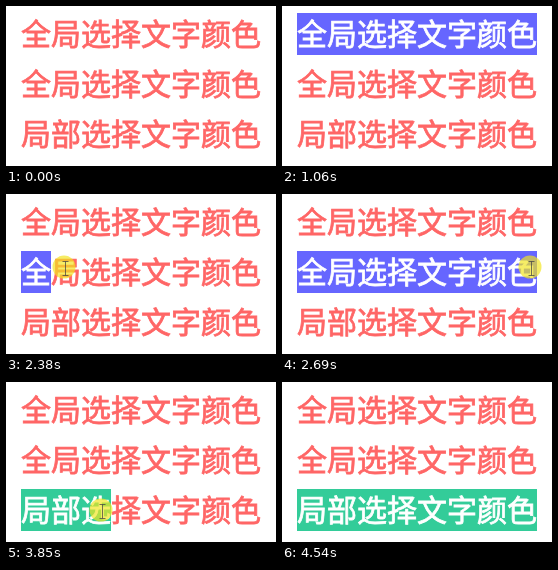
Animation, 270 px wide and 160 px high, one loop 5170 ms. Source, as an HTML page:

```html
<!DOCTYPE html>
<html lang="zh-CN">
<head>
<meta charset="utf-8">
<title>选择文字颜色</title>
<style>
html, body { margin: 0; width: 100%; height: 100%; overflow: hidden; background: #fff; }
#stage { position: relative; width: 270px; height: 160px; overflow: hidden; }
p {
  position: absolute; left: 15px; margin: 0; height: 42px; white-space: nowrap;
  display: flex; color: #f66; -webkit-text-stroke: .8px currentColor;
  font: 500 30px/38px "Noto Sans CJK SC", "Noto Sans CJK", sans-serif;
}
p:nth-of-type(1) { top: 7px; }
p:nth-of-type(2) { top: 57px; }
p:nth-of-type(3) { top: 107px; }
p span { width: 30px; height: 42px; }
.on { color: #fff; background: #66f; }
p:nth-of-type(3) .on { background: #3c9; }
svg { position: absolute; left: 0; top: 0; }
</style>
</head>
<body>
<div id="stage">
  <p>全局选择文字颜色</p>
  <p>全局选择文字颜色</p>
  <p>局部选择文字颜色</p>
  <svg width="270" height="160">
    <g id="pointer">
      <circle id="press" r="11.5" fill="#f2e41e" fill-opacity=".68"/>
      <path id="beam" d="M-1.5-5.5h6M1.5-5.5v14M-1.5 8.5h6" fill="none" stroke="#444" stroke-opacity=".75"/>
      <path id="arrow" d="M.5.5V16.5L4.2 13 6.8 18.6 9.3 17.5 6.9 12H11.8Z" fill="#fff" stroke="#111"/>
    </g>
  </svg>
</div>
<script>
const LOOP = 5170, FIRST = 57, STEP = 77.1;
const $ = id => document.getElementById(id);

const smooth = u => u * u * (3 - 2 * u);
const easeOut = u => 1 - (1 - u) ** 2;
const linear = u => u;

// Pointer moves; each rests at its end until the next. A row means the button is down.
const moves = [
  { start: 0, end: 0, from: [300, 46], to: [300, 46], ease: linear },
  { start: 55, end: 590, from: [218, 46], to: [21, 26], ease: smooth },
  { start: 750, end: 1055, from: [18, 28], to: [290, 28], ease: smooth, row: 0 },
  { start: 1440, end: 1910, from: [77, 50], to: [13, 72], ease: smooth },
  { start: 1980, end: 2220, from: [16, 73], to: [16, 73], ease: linear, row: 1 },
  { start: 2220, end: 2830, from: [16, 73], to: [290, 73], ease: smooth, row: 1 },
  { start: 2980, end: 3610, from: [260, 61], to: [14, 135], ease: easeOut },
  { start: 3660, end: 4220, from: [14, 130], to: [273, 125], ease: linear, row: 2 },
  { start: 4525, end: 4600, from: [300, 125], to: [300, 125], ease: linear }
];

const rows = [...document.querySelectorAll('p')].map(p => {
  const spans = [...p.textContent].map(ch => {
    const s = document.createElement('span');
    s.textContent = ch;
    return s;
  });
  p.replaceChildren(...spans);
  return spans;
});

function locate({ start, end, from, to, ease }, t) {
  const u = ease(Math.min(1, (t - start) / (end - start || 1)));
  return from.map((a, i) => Math.round(a + (to[i] - a) * u));
}

const show = (el, on) => el.setAttribute('visibility', on ? 'visible' : 'hidden');

function draw(time) {
  const t = Math.max(0, FIRST + STEP * Math.floor((time - FIRST) / STEP));
  const begun = moves.filter(m => m.start <= t);
  const move = begun.at(-1);
  const drag = begun.findLast(m => m.row !== undefined);

  const count = drag ? Math.round((locate(drag, t)[0] - 15) / 30) : 0;
  rows.forEach((spans, r) => spans.forEach((s, i) =>
    s.classList.toggle('on', !!drag && r === drag.row && i < count)));

  const [x, y] = locate(move, t);
  const pressed = move === drag;
  const overText = x >= 15 && x < 255 && y >= 7 && (y - 7) % 50 < 42;
  show($('press'), pressed);
  show($('beam'), pressed || overText);
  show($('arrow'), !pressed && !overText);
  $('pointer').setAttribute('transform', `translate(${x} ${y})`);
}

const start = performance.now();
function tick() {
  draw((performance.now() - start) % LOOP);
  requestAnimationFrame(tick);
}
tick();
</script>
</body>
</html>
```
